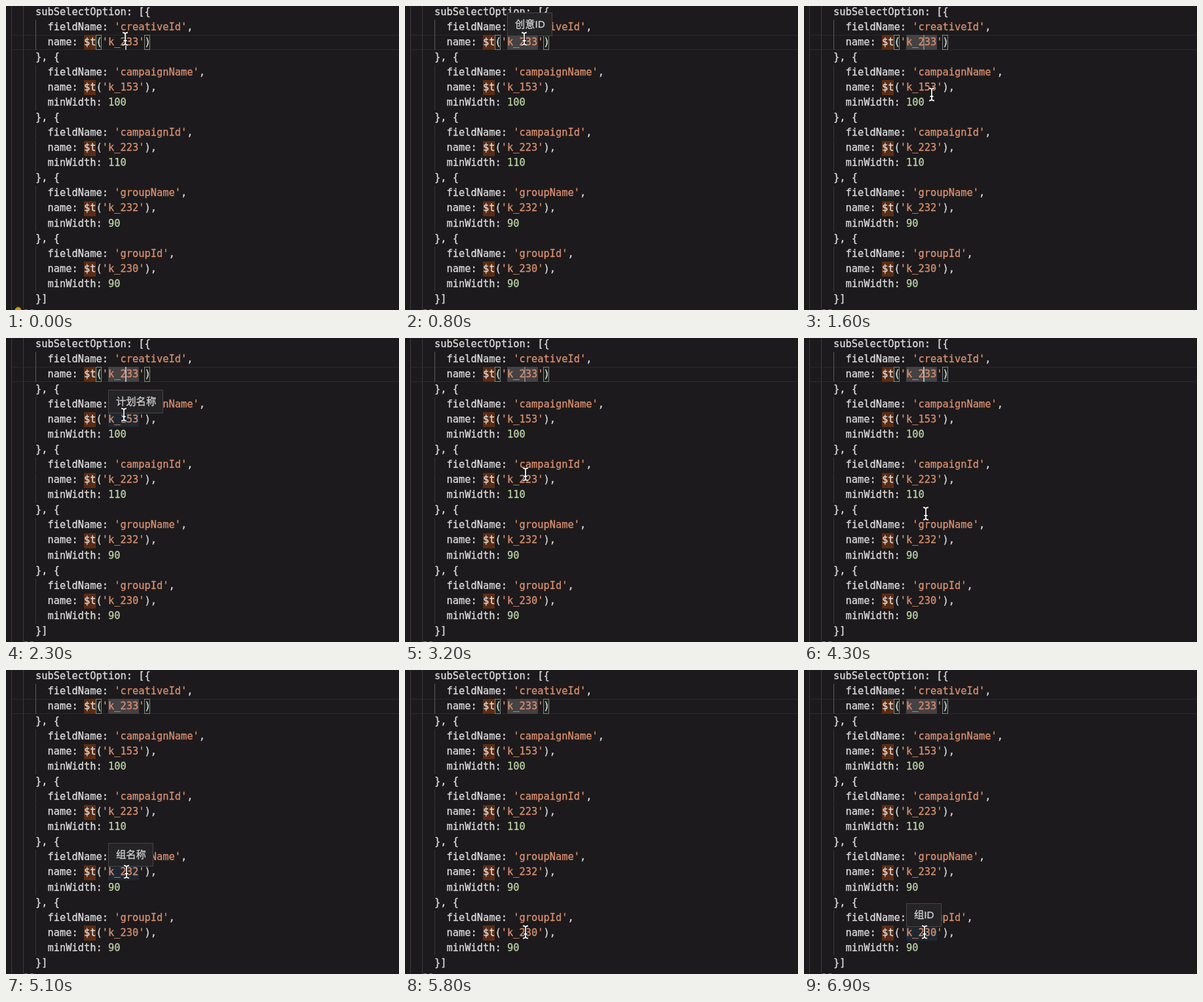
Write an HTML page with a canvas that moves like this. It is 600x464 px and loops after 7000 ms.

```html
<!DOCTYPE html>
<html lang="en">
<head>
<meta charset="utf-8">
<style>
html, body { margin: 0; width: 100%; height: 100%; overflow: hidden; background: #1c1a1c; }
canvas { display: block; }
</style>
</head>
<body>
<canvas id="stage" width="600" height="464"></canvas>
<script>
const ctx = document.getElementById('stage').getContext('2d');
const LOOP = 7000, STEP = 100;
const CHAR = 9.247, PITCH = 23.06, LEFT = 45;
const CODE_FONT = '15.36px "DejaVu Sans Mono", monospace';
const TIP_FONT = '15.3px "Liberation Sans", "Noto Sans CJK SC", sans-serif';
const TEXT = '#dddcdd', STRING = '#d98f6f', NUMBER = '#bdd6a6';

const lines = `subSelectOption: [{
  fieldName: 'creativeId',
  name: $t('k_233')
}, {
  fieldName: 'campaignName',
  name: $t('k_153'),
  minWidth: 100
}, {
  fieldName: 'campaignId',
  name: $t('k_223'),
  minWidth: 110
}, {
  fieldName: 'groupName',
  name: $t('k_232'),
  minWidth: 90
}, {
  fieldName: 'groupId',
  name: $t('k_230'),
  minWidth: 90
}]`.split('\n');

// start, end, line, text
const tips = [
  [500, 1300, 2, '创意ID'],
  [2100, 2700, 5, '计划名称'],
  [3500, 4000, 9, '计划ID'],
  [4900, 5400, 13, '组名称'],
  [6200, 7000, 17, '组ID']
];

// time, x, y
const path = [
  [0, 182, 50], [1200, 182, 50], [1600, 195, 135], [1900, 180, 117],
  [2700, 180, 117], [3200, 184, 208], [3400, 184, 215], [4000, 184, 215],
  [4300, 186, 268], [4700, 184, 308], [5400, 184, 308], [5800, 184, 400],
  [7000, 184, 400]
];

const colX = col => Math.round(LEFT + col * CHAR);
const lineTop = i => Math.round(i * PITCH - 2);
const clamp = v => Math.max(0, Math.min(1, v));

function fill(color, x, y, w, h) {
  ctx.fillStyle = color;
  ctx.fillRect(x, y, w, h);
}

function frame(color, x, y, w, h) {
  ctx.strokeStyle = color;
  ctx.lineWidth = 1;
  ctx.strokeRect(x + .5, y + .5, w - 1, h - 1);
}

// Text with a hairline outline for a slightly heavier weight
function write(text, x, y, color) {
  ctx.fillStyle = ctx.strokeStyle = color;
  ctx.lineWidth = .3;
  ctx.fillText(text, x, y);
  ctx.strokeText(text, x, y);
}

function drawLine(line, i) {
  const top = lineTop(i);
  if (line.startsWith(' ')) fill(i < 3 ? '#59575a' : '#3b393b', 45, top, 1, 23);
  const call = line.indexOf('$t');
  if (call > 0) fill('#5b2c14', colX(call), top, 18, 23);
}

function drawText(line, i) {
  ctx.font = CODE_FONT;
  for (const { 0: token, index } of line.matchAll(/'[^']*'|\b\d+\b|[^'\d]+/g)) {
    const color = token[0] === "'" ? STRING : /^\d/.test(token) ? NUMBER : TEXT;
    write(token, LEFT + index * CHAR, 13.7 + i * PITCH, color);
  }
}

function drawTip([, , row, text]) {
  const y = lineTop(row) - 34;
  ctx.font = TIP_FONT;
  const width = Math.round(ctx.measureText(text).width) + 23;
  fill('#242325', 156, y, width, 36);
  frame('#464547', 156, y, width, 36);
  write(text, 168, y + 23, '#d0cfd0');
}

function drawPointer(t) {
  const k = path.findIndex(p => p[0] > t);
  const [t0, x0, y0] = path[k - 1], [t1, x1, y1] = path[k];
  const u = (t - t0) / (t1 - t0);
  ctx.save();
  ctx.translate(x0 + (x1 - x0) * u, y0 + (y1 - y0) * u);
  const beam = new Path2D('M-4-9.5Q0-9.5 0-6.5Q0-9.5 4-9.5M0-6.5V6.5M-4 9.5Q0 9.5 0 6.5Q0 9.5 4 9.5M-2.5 3H2.5');
  for (const [color, width] of [['#111', 3.4], ['#f4f4f4', 1.8]]) {
    ctx.strokeStyle = color;
    ctx.lineWidth = width;
    ctx.stroke(beam);
  }
  ctx.restore();
}

function caretAlpha(t) {
  if (t < 500) return 1;
  const distance = Math.abs(t % 1000 - 400);
  return clamp((300 - Math.min(distance, 1000 - distance)) / 200);
}

function draw(t) {
  fill('#1c1a1c', 0, 0, 600, 464);
  frame('#2b292b', 8, 44, 600, 23);
  fill('#3b393b', 8, 0, 1, 464);
  fill('#3b393b', 26, 0, 1, 464);
  lines.forEach(drawLine);

  if (t >= 300) fill('#444244', colX(12), 44, 47, 23);
  for (const col of [10, 18]) {
    fill('#1b241c', colX(col), 44, 9, 23);
    frame('#858486', colX(col), 44, 9, 23);
  }

  const tip = tips.find(([start, end]) => t >= start && t < end);
  if (tip && tip[2] > 2) fill('#1f2832', colX(12), lineTop(tip[2]), 47, 23);
  lines.forEach(drawText);
  fill('#777577', 28, 463, 5, 1);
  fill('#777577', 37, 463, 5, 1);
  if (t < 400) {
    ctx.fillStyle = '#c9980f';
    ctx.beginPath();
    ctx.arc(18.5, 464.5, 5, 0, 7);
    ctx.fill();
  }

  ctx.globalAlpha = caretAlpha(t);
  fill('#b5b4b5', 182, 44, 2, 23);
  ctx.globalAlpha = 1;
  if (tip) drawTip(tip);
  drawPointer(t);
}

const began = performance.now();
function tick() {
  const t = (performance.now() - began) % LOOP;
  draw(Math.floor(t / STEP) * STEP);
  requestAnimationFrame(tick);
}
tick();
</script>
</body>
</html>
```
